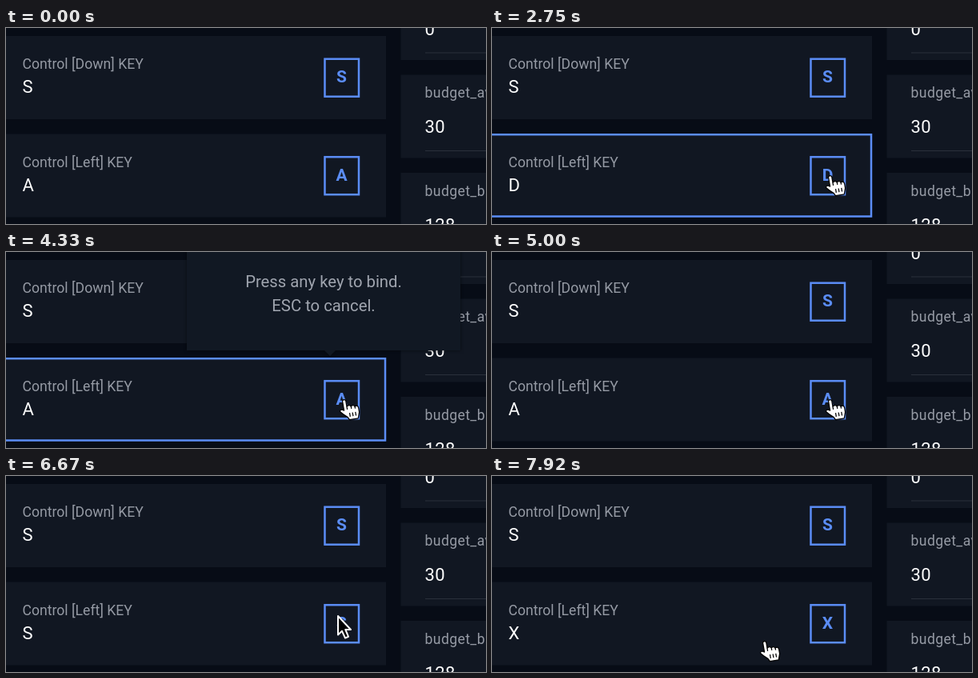
These frames come from a looping animation (600 px wide and 245 px high, 8000 ms). An HTML page:

```html
<!DOCTYPE html>
<html lang="en">
<head>
<meta charset="utf-8">
<title>Key binding</title>
<style>
  html, body { margin: 0; width: 100%; height: 100%; overflow: hidden; background: #070c16; }
  svg { display: block; width: 600px; height: 245px; font-family: Roboto, sans-serif; }
  .card { fill: #111722; }
  .label { font-size: 17.6px; fill: #959aa4; }
  .setting { letter-spacing: .4px; }
  .value { font-size: 22px; fill: #fff; }
  .key { font-size: 21px; font-weight: 700; fill: #5b8df6; text-anchor: middle; }
  .line { stroke: #2a303b; }
  .outline { fill: none; stroke: #5b8df6; stroke-width: 2.5; }
  .prompt { font-size: 20.3px; fill: #a0a5af; text-anchor: middle; }
  .popup { filter: drop-shadow(0 0 2px rgba(0, 0, 0, .5)); }
</style>
</head>
<body>
<svg viewBox="0 0 600 245">
  <rect width="600" height="245" fill="#070c16"/>
  <g id="cards"></g>
  <rect id="focus" class="outline" x="-10" y="133.2" width="484" height="102.3"/>
  <g id="popup">
    <path class="popup" fill="#111823" d="M226-20H568V123H412L405 130L398 123H226Z"/>
    <text class="prompt" x="397" y="43.5">Press any key to bind.</text>
    <text class="prompt" x="397" y="73.5">ESC to cancel.</text>
  </g>
  <g id="cursor">
    <path id="arrow" fill="#000" stroke="#fff" stroke-width="2" stroke-linejoin="round"
      d="M1 1V24.5L6 19.8L10 28.5L14 26.8L10.3 18H17Z"/>
    <g id="hand" transform="translate(-8 3.5) rotate(-10 5 0) scale(1.05)" stroke="#000" stroke-width="1.2" stroke-linejoin="round">
      <path fill="#fff" d="M4 1.500Q6-1 8 1.500V9Q11 6.500 13 9.500Q16 7.500 17.500 10.500Q21.500 9 21.500 13V18Q20.500 21 19 25H8.500Q7 21 3 18L-1 13.500Q0 10 4 13Z"/>
      <path fill="none" d="M8 9V12.500M13 9.500V12.500M17.500 10.500V13M10 17V21.500M13.500 17V21.500M17 17V21.500"/>
    </g>
  </g>
</svg>
<script>
const LOOP = 8000;
const PITCH = 122.5;
const $ = id => document.getElementById(id);
const clamp = n => Math.max(0, Math.min(1, n));

const control = (y, name, key, id = '') => `
  <rect class="card" x="-10" y="${y}" width="485" height="104"/>
  <text class="label" x="20.5" y="${y + 41}">Control [${name}] KEY</text>
  <text class="value" x="20.5" y="${y + 71}" ${id && `id="${id}Value"`}>${key}</text>
  <rect class="outline" x="398.5" y="${y + 28.7}" width="42.5" height="47"/>
  <text class="key" x="419.5" y="${y + 58.3}" ${id && `id="${id}Key"`}>${key}</text>`;

const setting = (y, name, value) => `
  <rect class="card" x="493.5" y="${y}" width="120" height="104"/>
  <text class="label setting" x="523.5" y="${y + 28.5}">${name}</text>
  <text class="value setting" x="523.5" y="${y + 72.5}">${value}</text>
  <path class="line" d="M524 ${y + 95}H600"/>`;

$('cards').innerHTML =
  control(10, 'Down', 'S') + control(10 + PITCH, 'Left', 'A', 'left') +
  setting(58.5 - PITCH, '', '0') + setting(58.5, 'budget_av', '30') +
  setting(58.5 + PITCH, 'budget_b', '128');

// Each binding: prompt opens, prompt closes, key bound on closing.
const bindings = [
  [1165, 2740, 'D'], [3325, 3825, 'A'], [4165, 4740, 'A'],
  [5075, 5825, 'S'], [6745, 7165, 'X'],
];

// Pointer positions: time, x, y.
const path = [
  [330, 545, 255], [1050, 424, 181], [5090, 424, 181], [5420, 445, 262],
  [5900, 445, 262], [6550, 414, 174], [7330, 414, 174], [7900, 342, 203],
];
const handTimes = [[2740, 4500], [4740, 5160], [7165, LOOP]];

function pointerAt(t) {
  const next = path.findIndex(p => p[0] > t);
  if (next <= 0) return next ? path[path.length - 1].slice(1) : [0, 400];
  const [t0, x0, y0] = path[next - 1], [t1, x1, y1] = path[next];
  const u = (t - t0) / (t1 - t0), k = u * u * (3 - 2 * u);
  return [x0 + (x1 - x0) * k, y0 + (y1 - y0) * k];
}

function draw(t) {
  let key = 'A', popup = 0, focus = 0;
  for (const [open, close, bound] of bindings) {
    if (t < open) break;
    const shown = clamp((t - open) / 80);
    if (t < close) popup = focus = shown;
    else {
      key = bound;
      popup = 0;
      focus = clamp(1 - (t - close - 40) / 200);
    }
  }
  $('leftValue').textContent = $('leftKey').textContent = key;
  $('popup').setAttribute('opacity', popup);
  $('focus').setAttribute('opacity', focus);

  const hand = handTimes.some(([from, to]) => t >= from && t < to);
  $('hand').setAttribute('opacity', +hand);
  $('arrow').setAttribute('opacity', +!hand);
  $('cursor').setAttribute('transform', `translate(${pointerAt(t)})`);
}

const start = performance.now();
function tick() {
  draw((performance.now() - start) % LOOP);
  requestAnimationFrame(tick);
}
tick();
</script>
</body>
</html>
```
